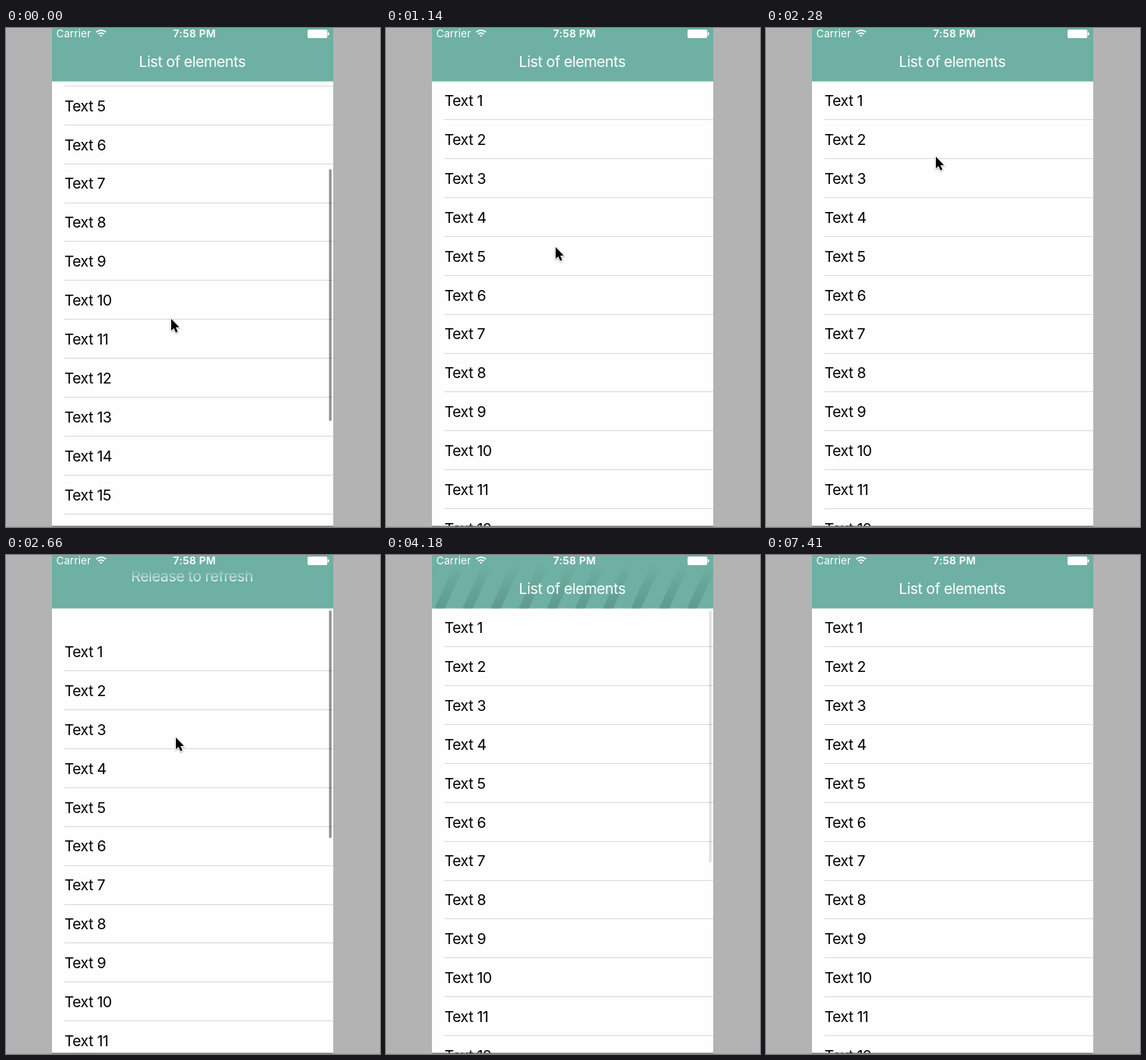
These frames come from a looping animation (480x640 px, 7.6 s). An HTML page with a canvas:

```html
<!DOCTYPE html>
<html lang="en">
<head>
<meta charset="utf-8">
<title>Pull to refresh</title>
<style>
html, body { margin: 0; width: 100%; height: 100%; overflow: hidden; background: #b3b3b3; }
canvas { display: block; }
</style>
</head>
<body>
<canvas width="480" height="640"></canvas>
<script>
const ctx = document.querySelector('canvas').getContext('2d');
const LOOP = 7600, STEP = 190;
const LEFT = 59, RIGHT = 420, WIDTH = RIGHT - LEFT, BAR = 68.7;
const ROW = 49.92, ROWS = 20;
const LIME = '200,238,146', WHITE = '255,255,255';
const ARROW = new Path2D('M0 0V15L3.4 11.9 5.9 17.5 8.4 16.4 6 11 10.4 10.7Z');

// Two drags: a short one that snaps back, then one that triggers the refresh.
const SHORT = { start: 1140, release: 1520, rest: 2000, depth: 30 };
const LONG = { start: 2280, release: 3420, rest: 4180, depth: 71.5 };

const clamp = (x, a = 0, b = 1) => Math.min(b, Math.max(a, x));
const ramp = (t, a, b) => clamp((t - a) / (b - a));
const ease = (t, a, b) => (1 - Math.cos(Math.PI * ramp(t, a, b))) / 2;
const easeOut = (t, a, b, power) => 1 - (1 - ramp(t, a, b)) ** power;
const bump = (t, a, b) => Math.sin(Math.PI * ramp(t, a, b));

const pull = (t, p) =>
  p.depth * easeOut(t, p.start, p.release, 1.4) * (1 - ease(t, p.release + STEP, p.rest));

// Positive when scrolled into the list, negative when pulled below the header.
const scrollAt = t => 193 * (1 - easeOut(t, 0, 570, 1.5)) - 14 * bump(t, 480, 900)
  - pull(t, SHORT) - pull(t, LONG);

const barAlphaAt = t => Math.max(
  1 - ramp(t, 760, 1140),
  ...[SHORT, LONG].map(p => ramp(t, p.start, p.start + STEP) * (1 - ramp(t, p.rest - 280, p.rest + 100)))
);

const cursorAt = t => [
  212 + 6 * ease(t, 0, 1330) + 13 * ease(t, 2660, 3420),
  373 + 52 * bump(t, 0, 760) - 92 * ease(t, 380, 1140)
    + 64 * bump(t, 1140, 1900) - 116 * ease(t, 1520, 2280)
    + 196 * ramp(t, LONG.start, LONG.release) ** 0.95 + 280 * ease(t, 3610, LONG.rest)
];

function text(str, x, y, size, fill, align = 'left', spacing = 0, weight = 400) {
  ctx.font = `${weight} ${size}px Inter, Roboto, sans-serif`;
  ctx.letterSpacing = spacing + 'px';
  ctx.textAlign = align;
  ctx.fillStyle = fill;
  ctx.fillText(str, x, y);
}

function rect(x, y, w, h, fill, r = 0) {
  ctx.fillStyle = fill;
  ctx.beginPath();
  ctx.roundRect(x, y, w, h, r);
  ctx.fill();
}

function drawList(scroll, barAlpha) {
  rect(LEFT, 0, WIDTH, 640, '#fefefe');
  for (let n = 1; n <= ROWS; n++) {
    const line = 67.6 + n * ROW - scroll;
    rect(75, Math.floor(line), RIGHT - 75, 1, '#d3dcd9');
    text('Text ' + n, 74.9, line - 17.6, 19.2, '#000', 'left', -0.46);
  }
  rect(414.6, 71 + Math.max(0, scroll) * 0.57, 3.2, 323 + Math.min(0, scroll),
    `rgba(0,0,0,${0.43 * barAlpha})`, 1.6);
}

function drawStripes(t) {
  const shade = ctx.createLinearGradient(0, 12, 0, BAR);
  shade.addColorStop(0, 'rgba(70,125,112,0)');
  shade.addColorStop(1, 'rgba(70,125,112,.42)');
  ctx.globalAlpha = ramp(t, 2850, 3230) * (1 - ramp(t, 6650, 7300));
  ctx.fillStyle = shade;
  const gap = 36, width = 13, lean = 26;
  for (let x = LEFT - 2 * gap + t * 0.0266 % gap; x < RIGHT; x += gap) {
    ctx.beginPath();
    ctx.moveTo(x, BAR);
    ctx.lineTo(x + lean, 12);
    ctx.lineTo(x + lean + width, 12);
    ctx.lineTo(x + width, BAR);
    ctx.fill();
  }
  ctx.globalAlpha = 1;
}

// Titles dissolve towards the top and bottom of the navigation bar.
function drawTitle(str, y, color, alpha) {
  const fade = ctx.createLinearGradient(0, 18, 0, BAR);
  fade.addColorStop(0, `rgba(${color},0)`);
  fade.addColorStop(0.36, `rgba(${color},${alpha})`);
  fade.addColorStop(0.68, `rgba(${color},${alpha})`);
  fade.addColorStop(1, `rgba(${color},0)`);
  text(str, 238.9, y, 19.2, fade, 'center', -0.44);
}

function drawTitles(t, scroll) {
  const base = 50.3, gap = 47;
  const released = t > LONG.release;
  const swap = ramp(t, LONG.release + STEP, LONG.rest - STEP);
  const drop = released ? 0 : clamp(-scroll, 0, gap);
  const color = released || scroll < -60 ? LIME : WHITE;
  drawTitle('Release to refresh', released ? base : base + drop - gap, color, 1 - swap);
  drawTitle('List of elements', base + drop, WHITE, released ? swap : 1 - ramp(drop, 10, 30));
}

function drawStatus() {
  text('Carrier', 64.5, 12.2, 13.5, '#fff', 'left', 0.05);
  text('7:58 PM', 242, 12.2, 13.5, '#fff', 'center', 0.25, 600);
  ctx.strokeStyle = '#fff';
  ctx.lineWidth = 1.8;
  for (const r of [1.6, 5.2, 8.8]) {
    ctx.beginPath();
    ctx.arc(122, 11.6, r, -Math.PI * 0.75, -Math.PI * 0.25);
    ctx.stroke();
  }
  rect(387, 2, 25.4, 11, '#fff', 2);
  rect(413, 5.5, 1.6, 4, '#fff', 0.8);
}

function drawHeader(t, scroll) {
  ctx.save();
  ctx.beginPath();
  ctx.rect(LEFT, 0, WIDTH, BAR);
  ctx.clip();
  rect(LEFT, 0, WIDTH, BAR, '#6eb0a3');
  drawStripes(t);
  drawTitles(t, scroll);
  drawStatus();
  ctx.restore();
}

function drawCursor(t) {
  ctx.save();
  ctx.translate(...cursorAt(t));
  ctx.shadowColor = 'rgba(0,0,0,.35)';
  ctx.shadowBlur = 2;
  ctx.shadowOffsetY = 1;
  ctx.strokeStyle = '#fff';
  ctx.lineWidth = 1.8;
  ctx.stroke(ARROW);
  ctx.shadowColor = 'transparent';
  ctx.fillStyle = '#000';
  ctx.fill(ARROW);
  ctx.restore();
}

function draw(now) {
  const t = Math.floor(now % LOOP / STEP) * STEP;
  const scroll = scrollAt(t);
  rect(0, 0, 480, 640, '#b3b3b3');
  drawList(scroll, barAlphaAt(t));
  drawHeader(t, scroll);
  if (t < LONG.rest) drawCursor(t);
  rect(0, 639, 480, 1, '#a6a6a6');
  rect(LEFT, 638.5, WIDTH, 1.5, '#777');
}

let start;
function tick(now) {
  start ??= now;
  draw(now - start);
  requestAnimationFrame(tick);
}
draw(0);
requestAnimationFrame(tick);
</script>
</body>
</html>
```
